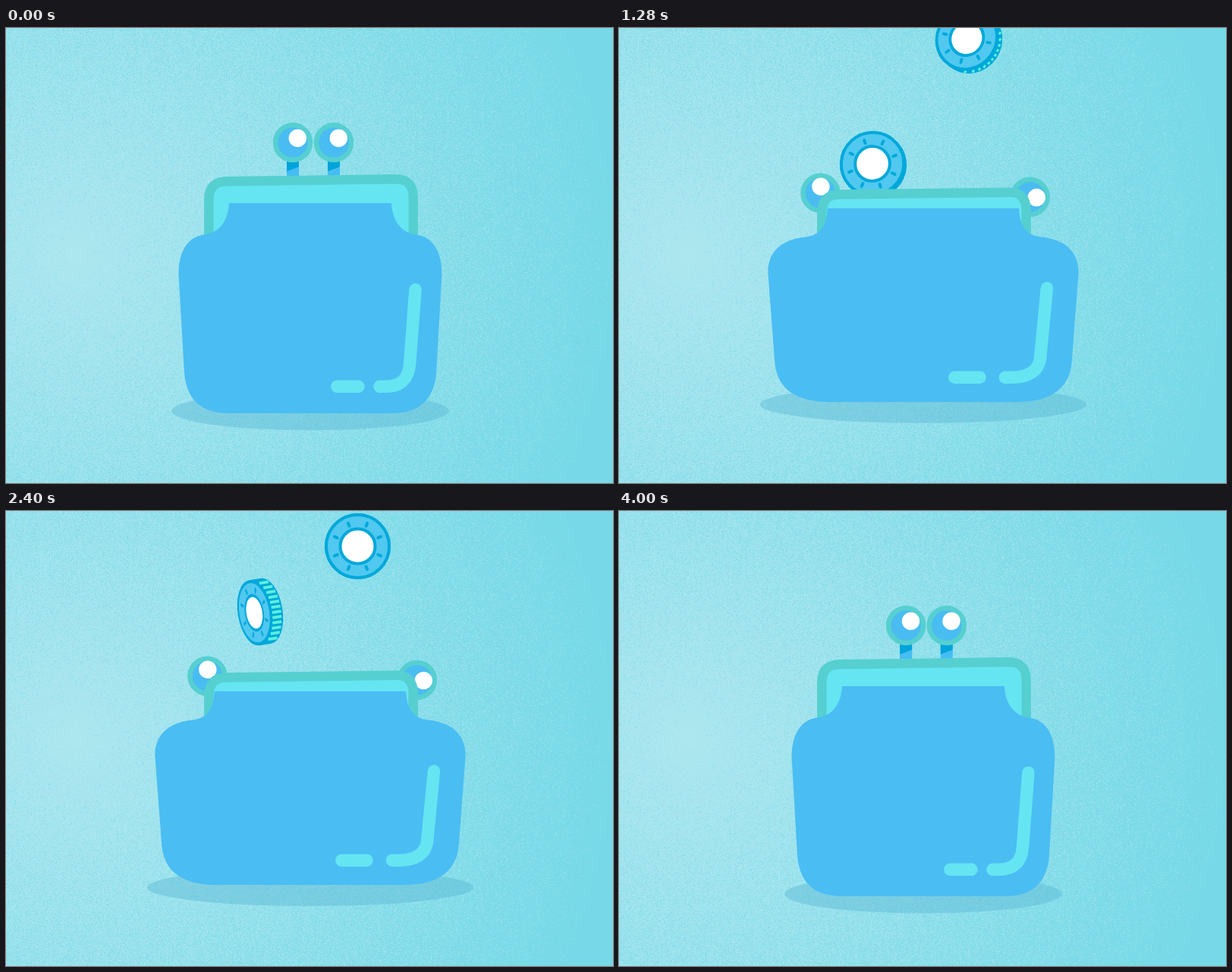
Recreate the animation shown at these times as an HTML page with a canvas. Size 800 by 600 pixels, loop 4040 ms.

```html
<!DOCTYPE html>
<html lang="en">
<head>
<meta charset="utf-8">
<title>Coin purse</title>
<style>
html, body { margin: 0; width: 100%; height: 100%; overflow: hidden; background: #93dfea; }
canvas, svg { position: absolute; left: 0; top: 0; width: 800px; height: 600px; display: block; }
</style>
</head>
<body>
<canvas id="bg" width="800" height="600"></canvas>
<svg viewBox="0 0 800 600">
  <defs>
    <g id="eye">
      <path d="M-8 15H8V50H-8Z" fill="#45bdf3"/>
      <path d="M-8 15H8V32L-8 38Z" fill="#00a3db"/>
      <circle r="23" fill="#49bcf2" stroke="#56cfd0" stroke-width="6.5"/>
      <circle cx="6.3" cy="-5.8" r="11.7" fill="#fff"/>
    </g>
  </defs>
  <ellipse id="shadow" cx="401" fill="#58b4d2" opacity=".43"/>
  <g id="left"><use href="#eye" x="378" y="151"/></g>
  <g id="right"><use href="#eye" x="432" y="151"/></g>
  <g id="coins"></g>
  <path id="clasp" fill="#65e4f2" stroke="#56cfd0" stroke-width="12.5"/>
  <path id="body" fill="#4abdf3"/>
  <path id="shine" fill="none" stroke="#65e4f2" stroke-width="16.5" stroke-linecap="round"/>
</svg>
<script>
const LOOP = 4040, STEP = 40, MID = 401;
const $ = id => document.getElementById(id);
const set = (id, attrs) => { for (const k in attrs) $(id).setAttribute(k, attrs[k]); };
const mix = (a, b, s) => a + (b - a) * s;
const rad = deg => deg * Math.PI / 180;

// Damped swing from 1 to 0
const spring = (u, half = 440) => u <= 0 ? 1 : .06 ** (u / half) * Math.cos(Math.PI * u / half);

// 0 is shut and tall, 1 is open and squashed
const openness = t => .96 * (spring(t - 3360) - spring(t - 230));

function bodyPath(s) {
  const m = (a, b) => mix(a, b, s);
  // Half widths and heights of neck, collar, shoulder, corner and base
  const nx = m(107, 127), ny = m(231, 238), cx = m(140, 155), cy = m(272.5, 275.5);
  const sx = m(173.5, 206), sy = m(325, 322), kx = m(166, 197), ky = m(455, 440);
  const bx = m(107, 124), by = m(508, 492.5);
  const half = [
    [nx, ny], [nx + 1, mix(ny, cy, .54)], [cx - 21, cy - 2.5],
    [cx, cy], [mix(cx, sx, .71), mix(cy, sy, .07)], [sx, mix(cy, sy, .48)],
    [sx, sy], [kx, ky], [kx - 3, mix(ky, by, .66)], [mix(bx, kx, .63), by], [bx, by]
  ];
  const r = half.map(([x, y]) => `${MID + x} ${y} `);
  const l = half.map(([x, y]) => `${MID - x} ${y} `);
  return `M${r[0]}C${r[1]}${r[2]}${r[3]}C${r[4]}${r[5]}${r[6]}L${r[7]}C${r[8]}${r[9]}${r[10]}` +
    `L${l[10]}C${l[9]}${l[8]}${l[7]}L${l[6]}C${l[5]}${l[4]}${l[3]}C${l[2]}${l[1]}${l[0]}Z`;
}

function claspPath(s) {
  const y = 202.3 + 18 * s;
  return `M267.3 282V${y + 24}Q267.3 ${y} 291 ${y}L514 ${y - 3}Q536.7 ${y - 3} 536.7 ${y + 21}V282`;
}

function shinePath(s) {
  const m = (a, b) => mix(a, b, s), y = m(472.8, 460.2);
  return `M${m(539.5, 565)} ${m(345, 343)}L${m(532, 556)} ${m(444, 436)}` +
    `Q${m(529.5, 552)} ${y} ${m(500, 518)} ${y}H${m(492.5, 509.5)}` +
    `M${m(436.5, 442.5)} ${y}H${m(464.5, 476)}`;
}

const FALL = .75, TUMBLE = .3, TWIST = .05;
const R = 43.5, THICK = 18, EDGE = '#00a8da', FACE = '#50c8f0', RIDGE = '#5cf0dc';

// Key coins: time, x, y, tumble and tilt in degrees at that time
const coins = [
  [1280, 335, 180, -9, 48], [1280, 461, 15.5, -21, 35],
  [1920, 399, 118, 86, -25], [1920, 475.5, 46.5, 0, 11.5],
  [2400, 335, 133, -60, -9], [2400, 463.5, 46.5, 0, 0]
];
// Steady drops between them
for (let i = 0; i < 4; i++)
  coins.push([1000 + 560 * i, 400 + 40 * Math.sin(2 * i), 100, 40 - 75 * i, 25 * Math.cos(2 * i)]);

function coin(x, y, tumble, tilt) {
  const c = Math.cos(rad(tumble)), k = Math.abs(c);
  const front = Math.sign(c) * Math.sin(rad(tumble)) * THICK / 2;
  const side = front > 0 ? -1 : 1, depth = 2 * Math.abs(front);
  let ridges = '', ticks = '';
  if (depth > 4) for (let h = -37.4; h < 38; h += 6.8) {
    const rim = front + side * k * Math.sqrt(R * R - h * h);
    ridges += `M${rim + side * 1.5} ${h}h${side * (depth - 3.5)}`;
  }
  for (let a = 0; a < 8; a++)
    ticks += `<path d="M29 0H33" transform="rotate(${22.5 + 45 * a})"/>`;
  return `<g transform="translate(${x} ${y}) rotate(${tilt})">
    <ellipse cx="${-front}" rx="${R * k}" ry="${R}" fill="${EDGE}"/>
    <rect x="${-depth / 2}" y="${-R}" width="${depth}" height="${2 * R}" fill="${EDGE}"/>
    <path d="${ridges}" stroke="${RIDGE}" stroke-width="3.8"/>
    <g transform="translate(${front} 0) scale(${k} 1)" stroke="${EDGE}" stroke-width="4" stroke-linecap="round">
      <circle r="${R - 2}" fill="${FACE}"/>${ticks}<circle r="23" fill="#fff"/>
    </g></g>`;
}

function coinsAt(t) {
  return coins.map(([t0, x, y0, tumble, tilt]) => {
    const dt = t - t0, y = y0 + FALL * dt;
    return y < -46 || y > 290 ? '' : coin(x, y, tumble + TUMBLE * dt, tilt + TWIST * dt);
  }).join('');
}

function paintBackdrop() {
  const ctx = $('bg').getContext('2d'), img = ctx.createImageData(800, 600), d = img.data;
  const light = [172, 230, 239], dark = [119, 217, 231];
  let seed = 7;
  const rnd = () => (seed = (Math.imul(seed, 1664525) + 1013904223) >>> 0) / 4294967296;
  for (let y = 0, i = 0; y < 600; y++) for (let x = 0; x < 800; x++, i += 4) {
    const p = Math.min(1, Math.hypot(x - 90, y - 300) / 720);
    const q = p + .45 * ((rnd() < p ? 1 : 0) - p);
    for (let n = 0; n < 3; n++) d[i + n] = mix(light[n], dark[n], q);
    d[i + 3] = 255;
  }
  ctx.putImageData(img, 0, 0);
}

function draw(t) {
  const s = openness(t), swing = s * (.7 + .3 * s), drop = 18 * s;
  set('shadow', { cy: mix(505, 496, s), rx: mix(183, 216.5, s), ry: mix(25.5, 24.7, s) });
  set('left', { transform: `translate(0 ${drop}) rotate(${-47 * swing} 382 313)` });
  set('right', { transform: `translate(0 ${drop}) rotate(${50 * swing} 424.7 303.2)` });
  set('clasp', { d: claspPath(s) });
  set('body', { d: bodyPath(s) });
  set('shine', { d: shinePath(s) });
  $('coins').innerHTML = coinsAt(t);
}

paintBackdrop();
const start = performance.now();
function tick() {
  const t = (performance.now() - start) % LOOP;
  draw(Math.floor(t / STEP) * STEP);
  requestAnimationFrame(tick);
}
tick();
</script>
</body>
</html>
```
